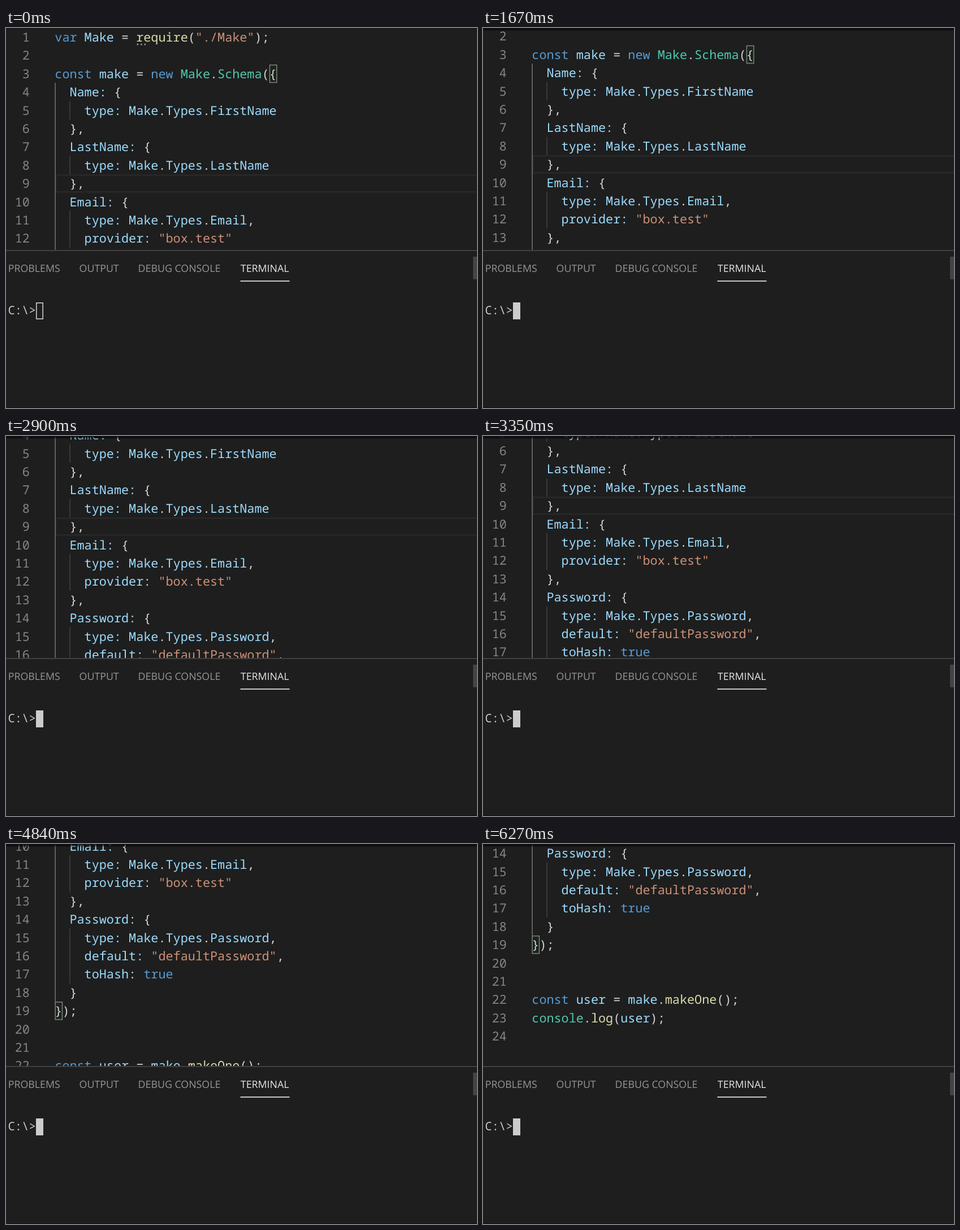
An HTML page for the animation above (8000 ms loop, 833 by 673 pixels).

```html
<!DOCTYPE html>
<html lang="en">
<head>
<meta charset="utf-8">
<title>Editor scroll</title>
<style>
  html, body { margin: 0; width: 100%; height: 100%; overflow: hidden; background: #1e1e1e; }
  svg { display: block; }
  text { white-space: pre; text-rendering: geometricPrecision; }
  .mono { font: 21.8px "Noto Sans Mono", "DejaVu Sans Mono", monospace; }
  .tab { font: 17.8px "Open Sans", "Noto Sans", sans-serif; fill: #969696; }
  .prompt { font-size: 20.6px; fill: #ccc; }
</style>
</head>
<body>
<svg width="833" height="673">
  <defs>
    <linearGradient id="fade" x2="0" y2="1">
      <stop stop-color="#000"/>
      <stop offset="1" stop-color="#000" stop-opacity="0"/>
    </linearGradient>
  </defs>
  <svg width="833" height="393"><g id="code" class="mono"></g></svg>
  <rect id="shadow" width="833" height="6" fill="url(#fade)"/>
  <rect width="833" height="1" fill="#111"/>
  <rect y="393.4" width="833" height="1.6" fill="#484848"/>
  <g class="tab">
    <text x="3.8" y="432">PROBLEMS</text>
    <text x="129.6" y="432">OUTPUT</text>
    <text x="233.6" y="432">DEBUG CONSOLE</text>
    <text x="414.8" y="432" fill="#e7e7e7">TERMINAL</text>
  </g>
  <rect x="414.5" y="447.4" width="87" height="1.7" fill="#e7e7e7"/>
  <rect x="826" y="405" width="7" height="40" fill="#444"/>
  <text class="mono prompt" x="3.4" y="507">C:\&gt;</text>
  <rect id="cursor" x="53.8" y="486.8" width="11.4" height="28.4" fill="none" stroke="#ccc" stroke-width="1.6"/>
  <rect y="672" width="833" height="1" fill="#111"/>
</svg>
<script>
const LOOP = 8000, ROW = 32.4, LEFT = 86.3, CHAR = 13.08;
const $ = id => document.getElementById(id);
const code = $('code');

const lines = `var Make = require("./Make");

const make = new Make.Schema({
  Name: {
    type: Make.Types.FirstName
  },
  LastName: {
    type: Make.Types.LastName
  },
  Email: {
    type: Make.Types.Email,
    provider: "box.test"
  },
  Password: {
    type: Make.Types.Password,
    default: "defaultPassword",
    toHash: true
  }
});


const user = make.makeOne();
console.log(user);
`.split('\n');

// Syntax groups in the order of the colours below.
const syntax = /(".*?")|\b(var|const|new|true)\b|((?<=new )Make|Schema|console)|(\w+(?=\())|(\w+:?)|([^\s\w"]+)/g;
const colours = ['#ce9178', '#569cd6', '#4ec9b0', '#dcdcaa', '#9cdcfe', '#d4d4d4'];

function add(tag, attrs, content = '') {
  const el = document.createElementNS('http://www.w3.org/2000/svg', tag);
  for (const key in attrs) el.setAttribute(key, attrs[key]);
  el.textContent = content;
  code.append(el);
}

const rowTop = n => (n - 1) * ROW;

function guide(x, first, last, fill) {
  add('rect', { x, y: rowTop(first), width: 1.6, height: (last - first + 1) * ROW, fill });
}

function bracket(n, col) {
  add('rect', {
    x: LEFT + col * CHAR + .8, y: rowTop(n) + .7, width: 12.4, height: ROW - 1.4,
    fill: 'rgba(0,100,0,.1)', stroke: '#888', 'stroke-width': 1.4
  });
}

add('rect', {
  x: 88.3, y: rowTop(9) + 1.3, width: 760, height: ROW - 2.6,
  fill: 'none', stroke: '#282828', 'stroke-width': 2.6
});
guide(86.3, 4, 18, '#707070');
for (const [first, last] of [[5, 5], [8, 8], [11, 12], [15, 17]]) guide(112.3, first, last, '#404040');
bracket(3, 29);
bracket(19, 0);

lines.forEach((line, i) => {
  const y = Math.round(rowTop(i + 1) + 24);
  add('text', { x: 41.8, y, 'text-anchor': 'end', fill: '#858585' }, i + 1);
  for (const m of line.matchAll(syntax)) {
    const kind = m.slice(1).findIndex(g => g !== undefined);
    add('text', { x: LEFT + m.index * CHAR, y, fill: colours[kind] }, m[0]);
  }
});
for (const cx of [232.8, 239.3, 245.8]) add('circle', { cx, cy: 29, r: 1.5, fill: '#999' });

// Bursts of wheel ticks: start, end, tick count, scroll offset reached.
const bursts = [
  [970, 1060, 1, 17], [1390, 1440, 1, 34], [1850, 2270, 2, 68], [2320, 2600, 2, 102],
  [2830, 3350, 3, 152], [3400, 3820, 4, 220], [4100, 4840, 5, 304], [4890, 6090, 7, 421]
];
const TICK = 90;

// Each tick moves in three quick steps.
function tickPart(t) {
  if (t < 0) return 0;
  return t < TICK / 2 ? .4 : t < TICK ? .8 : 1;
}

function scrollAt(t) {
  let from = 0, pos = 0;
  for (const [start, end, count, to] of bursts) {
    const gap = count > 1 ? (end - start - TICK) / (count - 1) : 0;
    for (let i = 0; i < count; i++) pos += tickPart(t - start - i * gap) * (to - from) / count;
    from = to;
  }
  return Math.round(pos);
}

function draw(now) {
  const t = now % LOOP, y = scrollAt(t);
  code.setAttribute('transform', `translate(0 ${-y})`);
  $('shadow').setAttribute('opacity', y ? 1 : 0);
  $('cursor').setAttribute('fill', t < 460 ? 'none' : '#ccc');
}

const begin = performance.now();
function loop() {
  draw(performance.now() - begin);
  requestAnimationFrame(loop);
}
loop();
</script>
</body>
</html>
```
